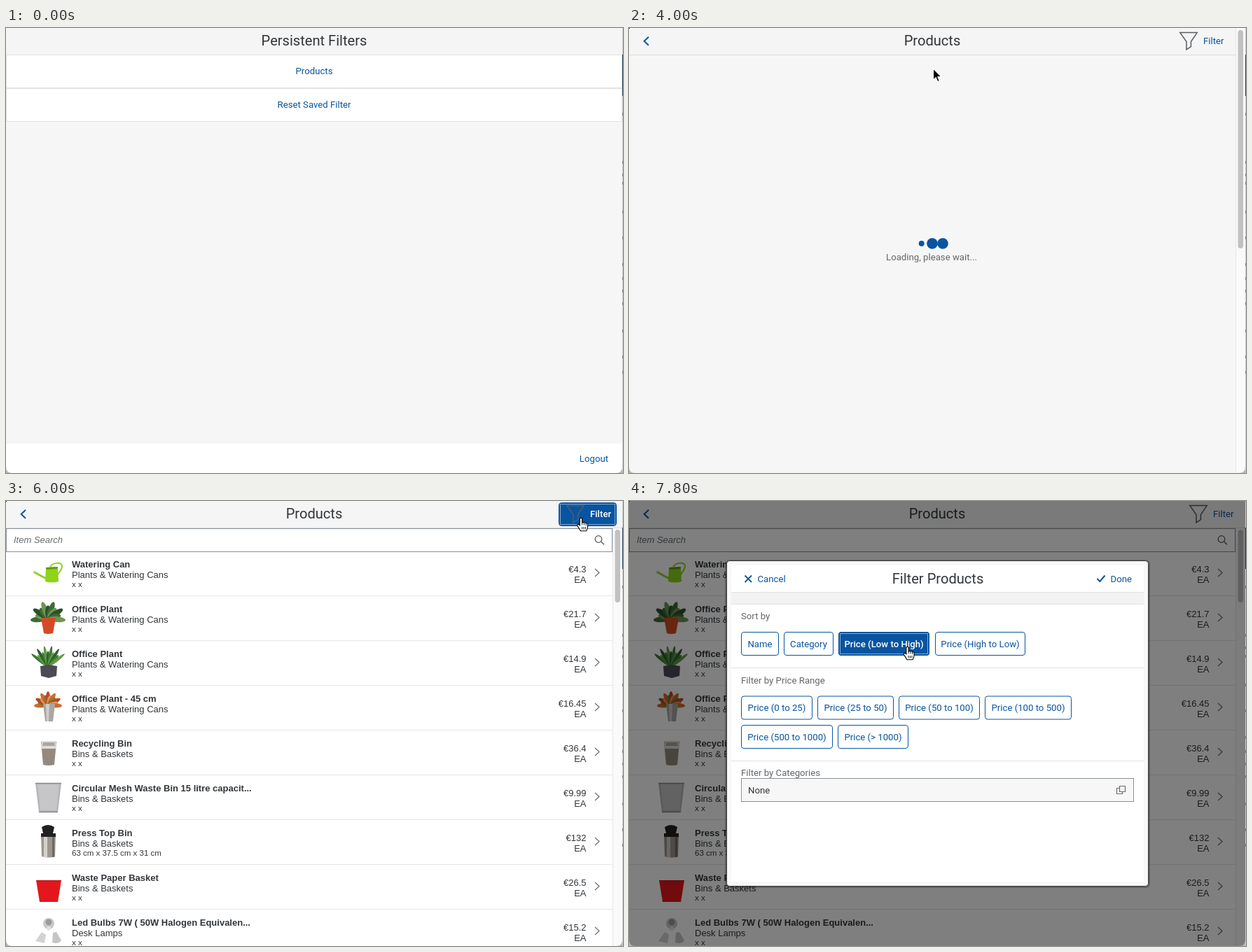
Recreate the animation shown at these times as an HTML page. Size 881x636 px, loop 8 s.

```html
<!DOCTYPE html>
<html lang="en">
<head>
<meta charset="utf-8">
<title>Product filters</title>
<style>
  html, body { margin: 0; width: 100%; height: 100%; overflow: hidden; background: #f6f6f6; }
  svg { display: block; }
  text { font: 13.2px Roboto, sans-serif; fill: #32363a; white-space: pre; }
  .title { font-size: 20.1px; }
  .link { fill: #0854a0; }
  .hot { fill: #fff; font-weight: 500; }
  .label { fill: #666; }
  .cell { font: 13px "Liberation Sans", Arial, sans-serif; }
  .bold { font-weight: bold; }
  .small { font-size: 11.5px; }
  .hint { font-style: italic; fill: #6a6d70; }
  .mid { text-anchor: middle; }
  .end { text-anchor: end; }
</style>
</head>
<body>
<svg id="stage" width="881" height="636" viewBox="0 0 881 636"></svg>
<script>
const BLUE = '#0854a0', GREY = '#89919a';
const text = (x, y, s, cls = '') => `<text x="${x}" y="${y}" class="${cls}">${s.replace(/&/g, '&amp;').replace(/>/g, '&gt;')}</text>`;
const rect = (x, y, w, h, fill, more = '') => `<rect x="${x}" y="${y}" width="${w}" height="${h}" fill="${fill}" ${more}/>`;
const fillPath = (d, fill) => `<path d="${d}" fill="${fill}"/>`;
const line = (d, color, w = 1) => `<path d="${d}" fill="none" stroke="${color}" stroke-width="${w}"/>`;
const dot = (x, y, r, fill) => `<circle cx="${x}" cy="${y}" r="${r}" fill="${fill}"/>`;
const group = (id, ...parts) => `<g id="${id}">${parts.join('')}</g>`;
const shift = (x, y, s) => `<g transform="translate(${x} ${y})">${s}</g>`;
const funnel = line('M786.8 6.6H811.2L802.4 19.5V26.5L796 30.8V19.5Z', '#5a5d60', 1.5);
const focusRing = (x, y, w, h) => rect(x, y, w, h, 'none', 'stroke="#fff" stroke-dasharray="1 1"');

const header = (mid, dx) =>
  rect(0, 0, 880, 38, '#f5f5f5') + line('M0 38.5H880', '#dcdcdc') +
  line('M28 12.7L21.7 18.7L28 24.7', BLUE, 2) +
  text(mid, 25, 'Products', 'title mid') +
  shift(dx, 0, funnel + text(820, 23.3, 'Filter', 'link'));

const scrollbar = (y, from, to) =>
  rect(866, y, 14, 636 - y, '#fafafa') + line(`M866.5 ${y}V636`, '#e6e6e6') +
  rect(869.5, from, 7.5, to - from, '#c1c1c1', 'rx="3.7"');

// Main menu
const menuRow = (y, s) => rect(.5, y + .5, 879, 47, '#fff', 'stroke="#e2e2e2"') + text(440, y + 28, s, 'link mid');
const menu = group('menu',
  rect(0, 0, 880, 38, '#f5f5f5'), text(440, 25, 'Persistent Filters', 'title mid'),
  menuRow(38, 'Products'), menuRow(86, 'Reset Saved Filter'),
  rect(0, 594, 880, 42, '#fff'), text(860, 620, 'Logout', 'link end'));

// Busy screen
const loading = group('loading',
  header(433, 0), scrollbar(0, 3, 315), '<g id="dots"></g>',
  text(432, 332, 'Loading, please wait...', 'label mid'));

// Product list
const plants = 'Plants & Watering Cans', bins = 'Bins & Baskets';
const items = [
  ['Watering Can', plants, '4.3'],
  ['Office Plant', plants, '21.7'],
  ['Office Plant', plants, '14.9'],
  ['Office Plant - 45 cm', plants, '16.45'],
  ['Recycling Bin', bins, '36.4'],
  ['Circular Mesh Waste Bin 15 litre capacit...', bins, '9.99'],
  ['Press Top Bin', bins, '132', '63 cm x 37.5 cm x 31 cm'],
  ['Waste Paper Basket', bins, '26.5'],
  ['Led Bulbs 7W ( 50W Halogen Equivalen...', 'Desk Lamps', '15.2'],
];
const row = ([name, kind, price, size = 'x x'], i) => shift(0, 72 + 64 * i,
  text(94, 23, name, 'cell bold') + text(94, 38, kind, 'cell') + text(94, 51, size, 'cell small') +
  text(828.5, 30, '€' + price, 'cell end') + text(828.5, 45, 'EA', 'cell end') +
  line('M841 25L847 30.5L841 36', '#6a6d70', 1.2) + line('M0 63.5H866', '#e5e5e5'));

// A ring of leaves growing from one point
const leaves = (x, y, n, len, wide, from, to, colors) => Array.from({ length: n }, (_, i) => {
  const angle = from + (to - from) * i / (n - 1), l = len * (1 - .25 * (i % 2));
  return `<ellipse cx="0" cy="${-l / 2}" rx="${wide}" ry="${l / 2}" fill="${colors[i % colors.length]}" transform="translate(${x} ${y}) rotate(${angle})"/>`;
}).join('');

const pictures = [
  line('M63 22C68 15 80 15 80 21C80 26 76 30 73 34', '#8ed01e', 2) +
    line('M58 39L50 35L41 30', '#8ed01e', 2.6) + dot(41, 30, 2, '#a9d957') +
    fillPath('M57 23L74 22L75 43Q66 46 56 43Z', '#8fd31a') + fillPath('M57 23L74 22L73 25L58 26Z', '#5f9c10'),
  leaves(60, 32, 11, 25, 4, -95, 95, ['#3f6b35', '#6d9654', '#2c5128']) +
    fillPath('M50 31H71L67 53Q60 55 54 53Z', '#d44a27'),
  leaves(60, 37, 11, 30, 2.3, -52, 52, ['#3d7a35', '#5f9c46', '#2d5f2b']) +
    fillPath('M49 36L61 34L73 36L72 50L61 53L50 50Z', '#4b4b56'),
  leaves(60, 28, 13, 20, 3.2, -92, 92, ['#d2692b', '#7a7a3c', '#b64a25', '#e29a5b']) +
    fillPath('M53 26H70L67 51H56Z', '#a9a6a3') + fillPath('M57 26H62L61 51H58Z', '#d0cecc'),
  fillPath('M50 16H72L69 49Q61 51 53 49Z', '#95897e') + fillPath('M51 15H71L72 26H50Z', '#dedcda') +
    fillPath('M53 17H69L70 22H52Z', '#aaa6a2'),
  fillPath('M42 11H79L74 53H47Z', '#b6b6b8') + fillPath('M45 13H76L72 50H49Z', '#c6c6c8') +
    line('M42 11.5H79M47 52.5H74', '#88888a', 1.5),
  fillPath('M50 21H71L70 52Q60 55 51 52Z', '#9c9690') + rect(54, 22, 5, 31, '#d4d0cc') + rect(66, 22, 3, 31, '#6d6863') +
    fillPath('M50 24V19H53L51 10Q60 4 69 10L67 19H71V24Z', '#202020'),
  fillPath('M43 22H79L74 53H48Z', '#e3171b') + line('M43 22.5H79', '#b80e12'),
  dot(61, 20, 8, '#c9c9cb') + dot(61, 18, 4.5, '#9b9b9d') + fillPath('M42 45L51 32L57 36L55 48Z', '#d3d3d5') +
    fillPath('M67 33L72 32L79 44Q75 50 66 47Z', '#c5c5c7') + dot(61, 27, 3, '#e3e3e4'),
];

const list = group('list',
  header(440, 14), rect(0, 39, 866, 597, '#fff'), scrollbar(39, 41, 145),
  rect(.5, 39.5, 865, 33, '#fff', `id="search" stroke="${GREY}"`),
  text(11, 60, 'Item Search', 'cell hint'),
  line('M849.8 58.3L854 62.3', '#555', 1.3), `<circle cx="846" cy="54.5" r="4.8" fill="none" stroke="#555" stroke-width="1.2"/>`,
  items.map(row).join(''),
  group('pictures', pictures.map((p, i) => shift(0, 72 + 64 * i, p)).join('')),
  group('hover', rect(789.5, 2.5, 82, 33, '#ebf5fe', `rx="4" stroke="${BLUE}"`),
    shift(14, 0, funnel + text(820, 23.3, 'Filter', 'link'))),
  group('pressed', rect(789.5, 2.5, 82, 33, BLUE, `rx="4" stroke="${BLUE}"`), focusRing(791.5, 4.5, 78, 29),
    shift(14, 0, funnel + text(820, 23.3, 'Filter', 'hot'))));

// Filter dialog
const button = (x, y, w, s, hot) =>
  rect(x + .5, y + .5, w - 1, 33, hot ? BLUE : '#fff', `rx="3.5" stroke="${BLUE}"`) +
  (hot ? focusRing(x + 2.5, y + 2.5, w - 5, 29) : '') +
  text(x + w / 2, y + 21.7, s, 'mid ' + (hot ? 'hot' : 'link'));
const rule = y => line(`M146 ${y}H735`, '#e2e2e2');
const dialog = group('dialog',
  rect(0, 0, 880, 636, '#000', 'opacity=".5"'),
  rect(137, 84, 607, 469, '#000', 'rx="6" opacity=".25"'),
  rect(139.5, 85.5, 602, 465, '#f8f8f8', 'rx="4" stroke="#3c3c3c"'),
  rect(146, 92, 589, 452, '#fff'), rect(146, 131, 589, 16, '#f2f2f2'),
  [130.5, 147.5, 238.5, 371.5].map(rule).join(''),
  line('M165.5 106.5L175 116M175 106.5L165.5 116', BLUE, 1.8), text(183.5, 115.8, 'Cancel', 'link'),
  text(441, 117.5, 'Filter Products', 'title mid'),
  line('M668.5 111L672.3 115L679.5 106.5', BLUE, 2), text(718, 115.8, 'Done', 'link end'),
  text(160, 169, 'Sort by', 'label'),
  button(160, 187, 54, 'Name'), button(221, 187, 71, 'Category'),
  button(299, 187, 130, 'Price (Low to High)'), button(437, 187, 129, 'Price (High to Low)'),
  text(160, 260.5, 'Filter by Price Range', 'label'),
  button(160, 278.5, 102, 'Price (0 to 25)'), button(269, 278.5, 109, 'Price (25 to 50)'),
  button(385, 278.5, 116, 'Price (50 to 100)'), button(508, 278.5, 124, 'Price (100 to 500)'),
  button(160, 320, 131, 'Price (500 to 1000)'), button(298, 320, 101, 'Price (> 1000)'),
  text(160, 393, 'Filter by Categories', 'label'),
  rect(160.5, 396.5, 560, 33, '#f7f7f7', `stroke="${GREY}"`), text(170, 417.8, 'None'),
  line('M700.5 407.5H708.5V415.5H700.5ZM700.5 410.5H696.5V418.5H704.5V415.5', '#6a6d70', 1.2),
  group('chosen', button(299, 187, 130, 'Price (Low to High)', true)));

// Window edge with slivers of what lies behind it
const edge = rect(880, 0, 1, 636, '#c9c9c9') + rect(880, 38, 1, 59, '#22384f') +
  [121, 190, 208, 220, 261, 298, 336, 356, 374, 392, 431, 468, 490].map(y => rect(880, y, 1, 4, '#77797c')).join('') +
  fillPath('M0 627V636H9Q0 636 0 627ZM880 627V636H871Q880 636 880 627Z', '#b5b5b5');

const outlined = (d, fill, stroke) => `<path d="${d}" fill="${fill}" stroke="${stroke}" stroke-width="1.1" stroke-linejoin="round"/>`;
const cursor = group('cursor',
  group('arrow', outlined('M0 0V16L3.7 12.7L6.2 18.7L8.8 17.6L6.3 11.7H11.3Z', '#000', '#fff')),
  group('hand', outlined('M-1.6 1.2Q0-.8 1.6 1.2V7Q3 5.6 4.4 7.2Q5.8 6 7.2 7.8Q9.6 7 9.6 9.8V13Q9.4 16 7.6 18.8H-.6Q-2.6 15.4-5 11.6Q-6 9.4-3.6 9.2L-1.6 11Z', '#fff', '#000') +
    line('M1.6 7V10M4.4 7.5V10.5M7.2 8V11M1.6 13V16.5M4 13V16.5M6.4 13V16.5', '#000', .9)),
  group('beam', line('M-3.5-9Q0-9 0-6.5Q0-9 3.5-9M0-6.5V6.5M-3.5 9Q0 9 0 6.5Q0 9 3.5 9M-2 3.5H2', '#000', 1.3)));

const stage = document.getElementById('stage');
stage.innerHTML = rect(0, 0, 881, 636, '#f6f6f6') + menu + loading + list + dialog + edge +
  group('speck', rect(0, 0, 1, 1, '#000')) + cursor;

const el = id => document.getElementById(id);
const show = (id, on) => { el(id).style.display = on ? '' : 'none'; };

// Pointer stops: time, x, y
const stops = [[2000, 520, 330], [2600, 434.5, 58], [4800, 434.5, 58], [5600, 821, 24], [6200, 821, 24], [7600, 397.5, 208]];
function pointer(t) {
  const i = stops.findIndex(s => s[0] > t);
  if (i < 1) return stops[i < 0 ? stops.length - 1 : 0].slice(1);
  const [t0, x0, y0] = stops[i - 1], [t1, x1, y1] = stops[i];
  const p = (t - t0) / (t1 - t0), e = p * p * (3 - 2 * p);
  return [x0 + (x1 - x0) * e, y0 + (y1 - y0) * e];
}

function draw(now) {
  const t = Math.floor(now % 8000 / 200) * 200;
  const within = (a, b) => t >= a && t < b;
  const [x, y] = pointer(t);

  show('menu', t < 4000);
  show('loading', within(4000, 4400));
  show('list', t >= 4400);
  show('pictures', t >= 4800);
  show('hover', within(5600, 6000));
  show('pressed', within(6000, 6200));
  show('dialog', t >= 6200);
  show('chosen', t >= 7800);
  show('speck', t >= 200);

  const small = Math.floor((t - 4000) / 200) % 3;
  el('dots').innerHTML = [417.7, 433, 448].map((cx, i) => dot(cx, 308, i === small ? 4 : 7.8, BLUE)).join('');
  el('search').setAttribute('stroke', t < 6000 ? BLUE : GREY);
  el('search').setAttribute('stroke-width', t < 6000 ? 1.5 : 1);

  const hand = within(3000, 4000) || within(5600, 6200) || t >= 7600;
  const beam = within(4400, 5600) && y > 39;
  show('cursor', t >= 2000);
  show('hand', hand);
  show('beam', beam);
  show('arrow', !hand && !beam);
  el('cursor').setAttribute('transform', `translate(${x} ${y + (beam ? 1 : 0)})`);
  requestAnimationFrame(() => draw(performance.now() - start));
}
const start = performance.now();
draw(0);
</script>
</body>
</html>
```
